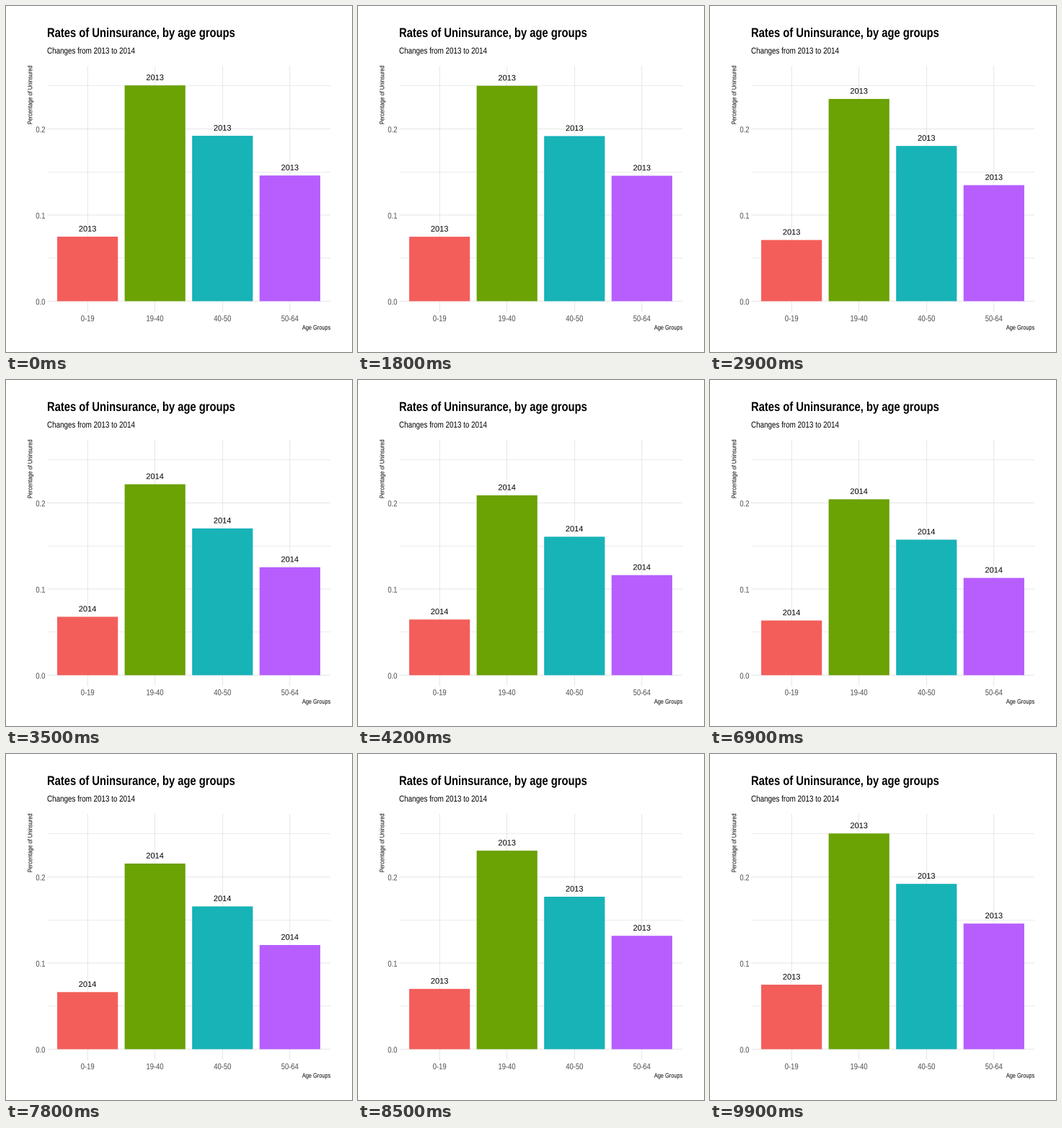
These frames come from a looping animation (480x480 px, 10000 ms). A matplotlib script:

```python
import numpy as np
import matplotlib.pyplot as plt
from matplotlib.animation import FuncAnimation
from matplotlib.patches import PathPatch, Rectangle
from matplotlib.textpath import TextPath
from matplotlib.transforms import Affine2D

SIZE, DPI = 480, 72
FRAMES, INTERVAL = 100, 100
LEFT, RIGHT, TOP, BOTTOM = 57, 450, 83, 425
ZERO, UNIT = 409.5, 1195          # pixel row of 0, pixels per 1.0
STEP = (RIGHT - LEFT) / 4.2
BAR = 0.9 * STEP
NARROW = 0.82                     # condensed sans face
GREY = "#4d4d4d"

GROUPS = ["0-19", "19-40", "40-50", "50-64"]
COLORS = ["#f35e5a", "#6ba204", "#17b3b7", "#b75eff"]
RATES = {
    "2013": np.array([0.0749, 0.2505, 0.1920, 0.1459]),
    "2014": np.array([0.0634, 0.2038, 0.1570, 0.1126]),
}
CENTERS = LEFT + STEP * (0.6 + np.arange(4))

fig = plt.figure(figsize=(SIZE / DPI, SIZE / DPI), dpi=DPI, facecolor="white")
ax = fig.add_axes([0, 0, 1, 1])
ax.set_xlim(0, SIZE)
ax.set_ylim(SIZE, 0)
ax.axis("off")


def glyphs(text, size, weight="normal", align="left"):
    """Outline of a line of text, shifted so that x = 0 is its anchor."""
    path = TextPath((0, 0), text, size=size,
                    prop={"family": "Liberation Sans", "weight": weight})
    box = path.get_extents()
    shift = {"left": 0, "center": (box.x0 + box.x1) / 2, "right": box.x1}[align]
    return path.transformed(Affine2D().translate(-shift, 0))


def place(x, y, width=1.0, angle=0):
    return (Affine2D().scale(width, -1).rotate_deg(-angle).translate(x, y)
            + ax.transData)


def write(x, y, text, size, color="black", weight="normal", align="left", angle=0):
    ax.add_artist(PathPatch(glyphs(text, size, weight, align), fc=color, lw=0,
                            snap=False, zorder=4,
                            transform=place(x, y, NARROW, angle)))


def rule(xs, ys, width):
    ax.plot(xs, ys, color="#cccccc", lw=width, snap=False, zorder=1,
            solid_capstyle="butt")


def state(frame):
    """Year shown and bar values, easing between the two years."""
    if frame < 49:
        a, b, t = "2013", "2014", (frame - 16) / 33
    else:
        a, b, t = "2014", "2013", (frame - 67) / 33
    ease = (1 - np.cos(np.pi * np.clip(t, 0, 1))) / 2
    return (a if ease < 0.5 else b), RATES[a] + (RATES[b] - RATES[a]) * ease


for k in range(6):
    y = ZERO - 0.05 * k * UNIT
    rule([LEFT, RIGHT], [y, y], 0.36 if k % 2 else 0.48)
for x in CENTERS:
    rule([x, x], [TOP, BOTTOM], 0.48)

write(LEFT, 43, "Rates of Uninsurance, by age groups", 18, weight="bold")
write(LEFT, 66, "Changes from 2013 to 2014", 12)
write(RIGHT, 449, "Age Groups", 9, align="right")
write(36.3, TOP, "Percentage of Uninsured", 9, align="right", angle=90)
for k in range(3):
    write(54, ZERO - 0.1 * k * UNIT + 4.8, f"{k / 10:.1f}", 11.5, GREY, align="right")
for x, name in zip(CENTERS, GROUPS):
    write(x, 437.3, name, 11.5, GREY, align="center")

years = {year: glyphs(year, 11.04, align="center") for year in RATES}
bars, labels = [], []
for x, color in zip(CENTERS, COLORS):
    bars.append(ax.add_patch(Rectangle((x - BAR / 2, ZERO), BAR, 0, fc=color,
                                       lw=0, snap=False, zorder=2)))
    labels.append(ax.add_artist(PathPatch(years["2013"], fc="black", lw=0,
                                          snap=False, zorder=3,
                                          transform=place(x, ZERO))))


def update(frame):
    year, values = state(frame)
    for x, value, bar, label in zip(CENTERS, values, bars, labels):
        bar.set_height(-value * UNIT)
        label.set_path(years[year])
        label.set_transform(place(x, ZERO - value * UNIT - 7.3))
    return bars + labels


anim = FuncAnimation(fig, update, frames=FRAMES, interval=INTERVAL,
                     repeat=True, repeat_delay=0, blit=False)
plt.show()
```
